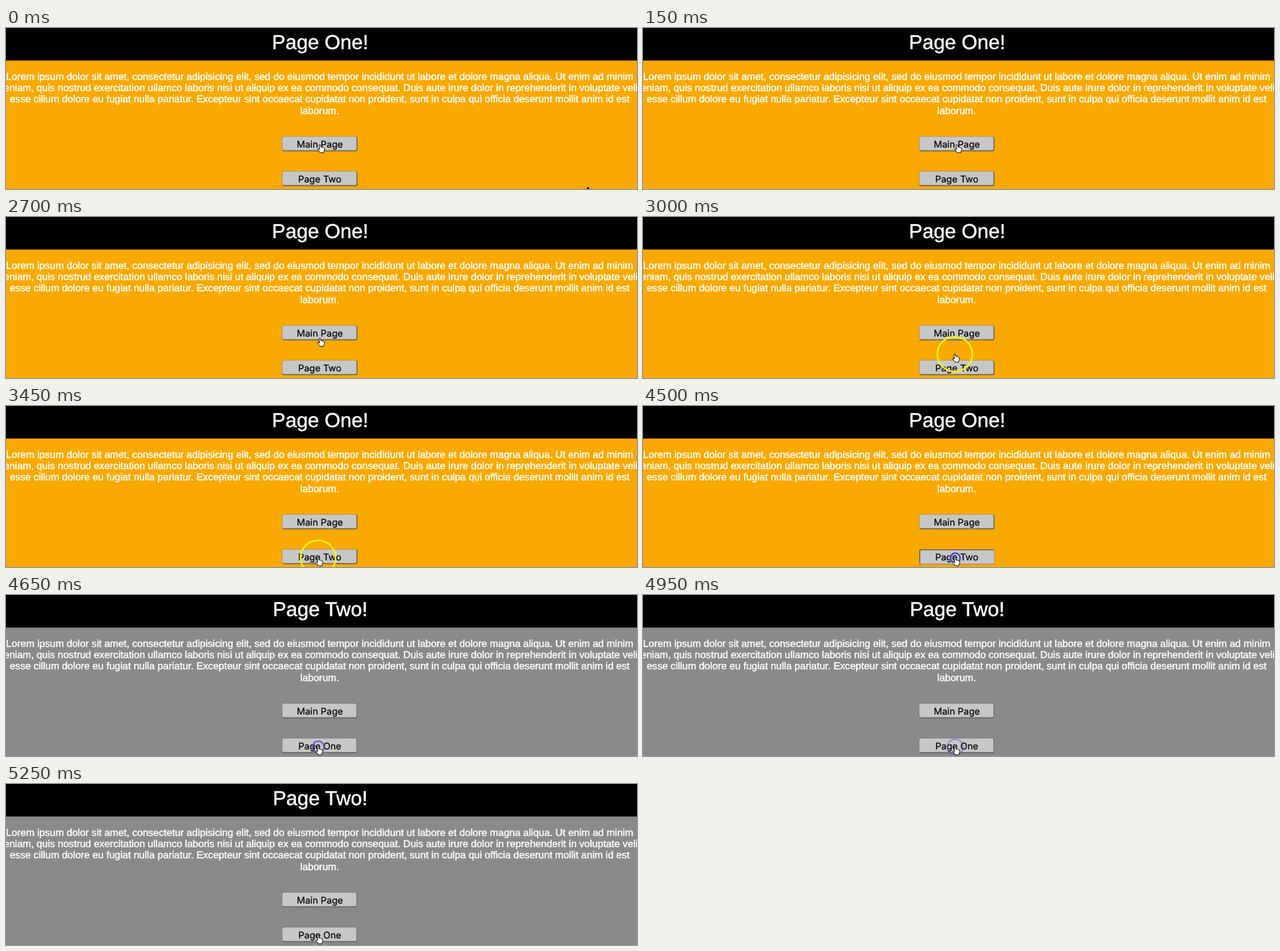
An HTML page that plays this animation: 955 by 245 pixels, repeating every 5350 ms.

```html
<!DOCTYPE html>
<html lang="en">
<head>
<meta charset="utf-8">
<title>Two pages</title>
<style>
  html, body { margin: 0; height: 100%; overflow: hidden; background: #000; }
  svg { display: block; }
  text { text-anchor: middle; text-rendering: geometricPrecision; fill: #fff; }
  .copy { font: 30.5px "Liberation Sans", Arial, sans-serif; stroke: #fff; stroke-width: .5px; }
  .body { font-size: 15.13px; stroke-width: .45px; }
  .button text { font: 14.05px Inter, "Open Sans", sans-serif; fill: #000; stroke: #000; stroke-width: .2px; }
</style>
</head>
<body>
<svg width="955" height="245" viewBox="0 0 955 245">
  <rect width="955" height="245"/>
  <rect id="back" y="49.5" width="955" height="196"/>
  <g class="copy">
    <text id="title" x="475.5" y="31.5"></text>
    <g class="body">
      <text x="474.7" y="78.7">Lorem ipsum dolor sit amet, consectetur adipisicing elit, sed do eiusmod tempor incididunt ut labore et dolore magna aliqua. Ut enim ad minim</text>
      <text x="474.7" y="96">veniam, quis nostrud exercitation ullamco laboris nisi ut aliquip ex ea commodo consequat. Duis aute irure dolor in reprehenderit in voluptate velit</text>
      <text x="474.7" y="113.3">esse cillum dolore eu fugiat nulla pariatur. Excepteur sint occaecat cupidatat non proident, sunt in culpa qui officia deserunt mollit anim id est</text>
      <text x="474.7" y="130.7">laborum.</text>
    </g>
  </g>
  <g id="buttons"></g>
  <path id="arrow" d="M879.5 245 V242.5 L881 242 L883.5 245Z"/>
  <circle id="halo" r="26.5" fill="none" stroke="#f6f50a" stroke-width="2.5"/>
  <circle id="click" cx="472.7" cy="231.2" fill="none" stroke="#4545d8" stroke-width="2.4"/>
  <path id="hand" fill="#fff" stroke="#111" stroke-width="1" stroke-linejoin="round"
    d="M-1.3 1 Q0 -.8 1 1 L1.6 4.2 Q3 3.4 3.8 4.7 Q5 4.1 5.5 5.4 Q7 5 7 6.8 Q7.2 9.5 5.8 11.2 V12.8 H.2 Q-.8 10.8 -3.4 8 Q-3.5 6.2 -1.8 7 L-.4 8Z"/>
</svg>
<script>
const $ = id => document.getElementById(id);
const show = (el, on) => el.setAttribute('visibility', on ? 'visible' : 'hidden');
const LOOP = 5350;

// [start ms, pointer x, pointer y]
const pointer = [
  [0, 475.2, 177], [2700, 475, 184], [2850, 472.5, 195], [3000, 472, 208],
  [3150, 472, 222], [3300, 472.3, 229.5], [3450, 472.3, 230.3]
];

function button(y) {
  const g = document.createElementNS('http://www.w3.org/2000/svg', 'g');
  g.setAttribute('class', 'button');
  g.innerHTML = `<rect x="418" y="${y}" width="114" height="22.7" rx="3"/>
    <rect y="${y}" height="21.3" rx="2.5" fill="#c7c7c7" stroke="#5a503c" stroke-opacity=".35"/>
    <text x="475" y="${y + 17}"></text>`;
  $('buttons').append(g);
  const [edge, face] = g.querySelectorAll('rect'), text = g.querySelector('text');
  return (label, pressed, grey) => {
    edge.setAttribute('fill', grey ? '#656565' : '#74674d');
    edge.setAttribute('width', grey ? 113.3 : 114);
    face.setAttribute('x', pressed ? 419.3 : 418);
    face.setAttribute('y', pressed ? y + 1.3 : y);
    face.setAttribute('width', 112.7);
    text.textContent = label;
  };
}
const mainButton = button(165), otherButton = button(218);

function draw(t) {
  const second = t >= 4650;
  $('back').setAttribute('fill', second ? '#8a8a8a' : '#f9a900');
  $('title').textContent = second ? 'Page Two!' : 'Page One!';
  mainButton('Main Page', false, second);
  otherButton(second ? 'Page One' : 'Page Two', t >= 4500 && !second, second);
  show($('arrow'), t < 150);

  const [, x, y] = pointer.findLast(p => p[0] <= t);
  $('hand').setAttribute('transform', `translate(${x} ${y})`);
  $('halo').setAttribute('cx', x);
  $('halo').setAttribute('cy', y + .7);
  show($('halo'), t >= 2850 && t < 3750);

  // the click ring widens and fades in 150 ms steps
  const step = Math.floor((t - 4500) / 150);
  show($('click'), step >= 0 && step < 5);
  $('click').setAttribute('r', 7.3 + Math.max(step, 0) * 1.5);
  $('click').setAttribute('opacity', 1 - Math.max(step, 0) * .2);
}

const start = performance.now();
function frame() {
  draw((performance.now() - start) % LOOP);
  requestAnimationFrame(frame);
}
frame();
</script>
</body>
</html>
```
